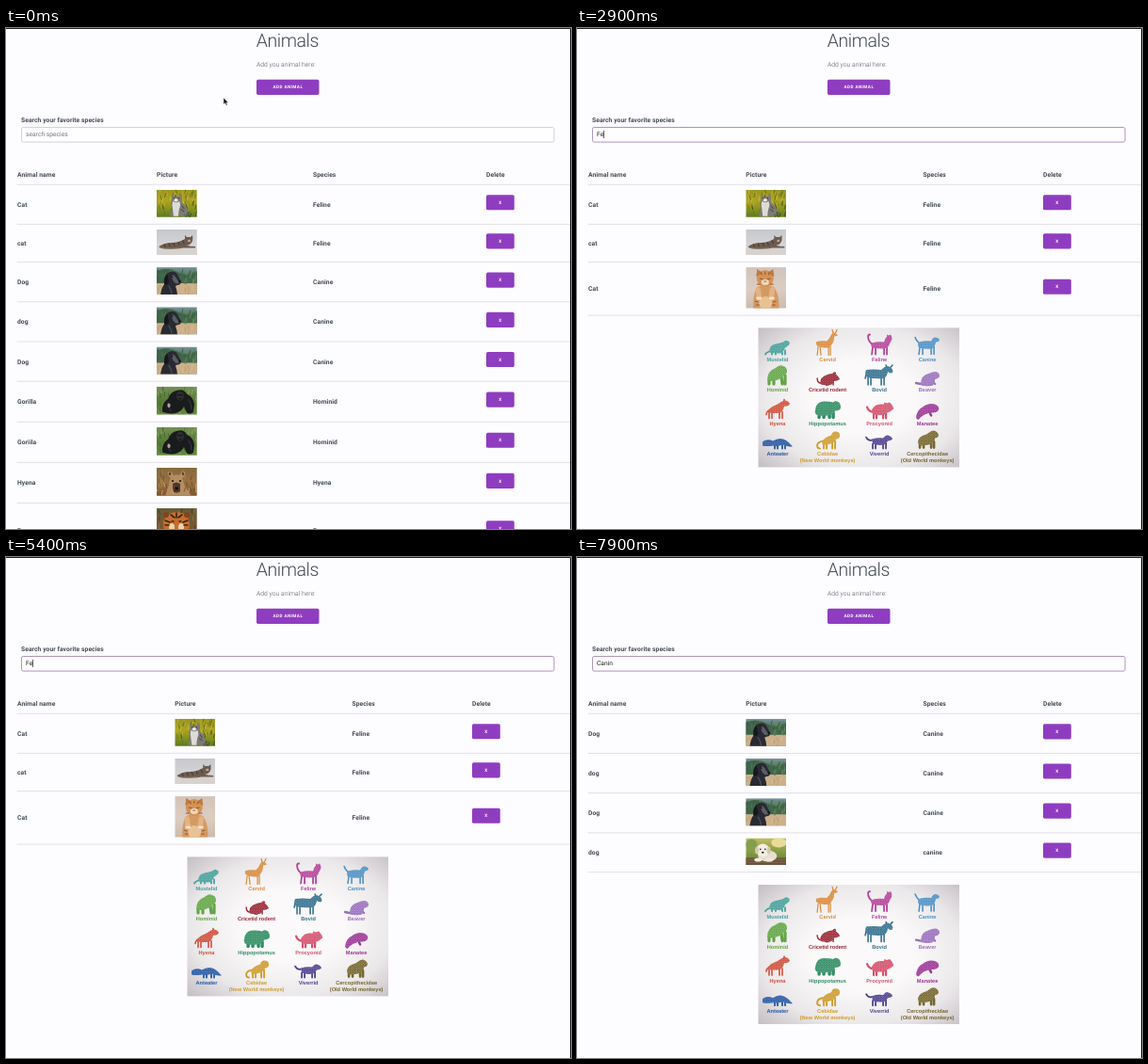
Animation of 600 by 532 pixels, one loop 8 s. Source, as an HTML page:

```html
<!DOCTYPE html>
<html lang="en">
<head>
<meta charset="utf-8">
<title>Animals</title>
<style>
  html, body { margin: 0; width: 100%; height: 100%; overflow: hidden; background: #fdfcff; }
  #stage { display: block; width: 600px; height: 532px; }
  text {
    font: 6.72px Roboto, sans-serif;
    letter-spacing: .01em;
    fill: #4b545d;
    text-rendering: geometricPrecision;
  }
  .bold { font-weight: 700; fill: #444c55; }
  .light { font-weight: 300; }
  .title { font-size: 19.5px; font-weight: 300; letter-spacing: -.42px; fill: #41494f; }
  .button { font-size: 4.62px; font-weight: 700; letter-spacing: .42px; fill: #fff; text-anchor: middle; }
  .label { font: 700 5.65px "Liberation Sans", Arial, sans-serif; letter-spacing: 0; text-anchor: middle; }
  #typed { fill: #222; letter-spacing: 0; }
  #hint { fill: #777; letter-spacing: 0; }
</style>
</head>
<body>
<svg id="stage" viewBox="0 0 600 532" xmlns="http://www.w3.org/2000/svg">
  <defs>
    <radialGradient id="paper" cx=".52" cy=".5" r=".72">
      <stop offset=".35" stop-color="#fbf9fa"/>
      <stop offset=".7" stop-color="#ebe8ea"/>
      <stop offset="1" stop-color="#c3bec3"/>
    </radialGradient>
    <pattern id="dots" width="2.6" height="2.6" patternUnits="userSpaceOnUse">
      <circle cx=".7" cy=".7" r=".6" fill="#fff"/>
      <circle cx="2" cy="2" r=".5" fill="#fff"/>
    </pattern>
  </defs>
  <rect width="600" height="532" fill="#fdfcff"/>
  <text class="title" x="265.7" y="19.6">Animals</text>
  <text class="light" x="266" y="40.6">Add you animal here:</text>
  <rect x="266" y="54.7" width="66.5" height="16.2" rx="1.7" fill="#8f3dc0"/>
  <text class="button" x="299.4" y="64.4">ADD ANIMAL</text>
  <text class="bold" x="16" y="100">Search your favorite species</text>
  <rect id="field" x="16.5" y="105.5" width="565.5" height="15.6" rx="1.8" fill="#fefdff" stroke="#d0cdd2" stroke-width=".9"/>
  <text id="hint" x="21" y="115.4">search species</text>
  <text id="typed" x="21" y="115.4"></text>
  <rect id="caret" y="109" width=".8" height="8" fill="#333"/>
  <g id="views"></g>
  <path d="M0 .5H599.5V532" fill="none" stroke="#1c1b20"/>
  <path id="arrow" d="M0 0V7.2L1.7 5.7L2.9 8.3L4.1 7.8L3 5.2H5.2Z" fill="#111" stroke="#fff" stroke-width=".5"/>
  <path id="beam" d="M-1.5-3.5Q0-3.5 0-2.5Q0-3.5 1.5-3.5M0-2.5V2.5M-1.5 3.5Q0 3.5 0 2.5Q0 3.5 1.5 3.5M-.8 .8H.8" fill="none" stroke="#222" stroke-width=".9"/>
</svg>
<script>
const $ = id => document.getElementById(id);
const rect = (x, y, w, h, fill) => `<rect x="${x}" y="${y}" width="${w}" height="${h}" fill="${fill}"/>`;
const oval = (x, y, rx, ry, fill) => `<ellipse cx="${x}" cy="${y}" rx="${rx}" ry="${ry}" fill="${fill}"/>`;
const shape = (d, fill) => `<path d="${d}" fill="${fill}"/>`;
const line = (d, color, w = 1) => `<path d="${d}" fill="none" stroke="${color}" stroke-width="${w}" stroke-linecap="round"/>`;
const text = (x, y, s, cls, extra = '') => `<text class="${cls}" x="${x}" y="${y}" ${extra}>${s}</text>`;

let gradients = 0;
function fade(...colors) {
  const id = 'fade' + gradients++;
  const stops = colors.map((c, i) => `<stop offset="${i / (colors.length - 1)}" stop-color="${c}"/>`).join('');
  return `<linearGradient id="${id}" x2="0" y2="1">${stops}</linearGradient>` + rect(0, 0, 43, 46, `url(#${id})`);
}

let seed = 7;
const rnd = () => (seed = seed * 16807 % 2147483647) / 2147483647;
function blades(n, top, height, colors) {
  return Array.from({ length: n }, () => {
    const x = rnd() * 43, y = top + rnd() * height;
    return line(`M${x.toFixed(1)} ${y.toFixed(1)}l${(rnd() * 3 - 1.5).toFixed(1)}-4`, colors[rnd() * colors.length | 0], .8);
  }).join('');
}

// Row height and flat drawing of each picture, 42.7 wide.
const pics = {
  cat: [42.1, fade('#98951f', '#aea422', '#7d8a20', '#3f6a1b', '#2f5717') +
    blades(45, 3, 15, ['#cdbb38', '#5d7020', '#c3b22e', '#4c691e']) +
    blades(25, 20, 10, ['#4f8423', '#284d14']) +
    shape('M14 28q1-5 2-9q-2-4 0-8l0-6l3 2h4l3-2q2 4 0 8q5 3 7 9q0 4-2 6z', '#7d7a75') +
    shape('M17 12q4 3 7 0q2 4 0 8q-1 4-1 8h-5l-1-8q-1-4 0-8z', '#dedbd6') +
    oval(20.5, 11, 2.2, 1.8, '#ece7e0') + line('M30 27q5 0 5-3', '#65625d', 1.6) +
    oval(18.6, 9, .7, .6, '#23241c') + oval(23, 9, .7, .6, '#23241c') +
    line('M27 17l2 3M26 21l3 2M20 5.8v1.4', '#45433f', 1)],
  loaf: [40.2, fade('#c6c7cc', '#d3d3d6', '#d2cfcf', '#d8d3d0') + rect(0, 20, 43, 9, '#d6d2cf') +
    shape('M4 17q5-3 12-3q7 0 12-3l2-1l0-4l2 2h4l2-2q1 5-1 8q-2 3-5 3q4 1 9 1v1.6h-13q-4 1-9 1q-10 1-15-1q-3-1 0-2.600z', '#6c5b4e') +
    line('M8 16l1 3M13 15l1 3M18 14.500l1 3M23 13.500l1 3M28 12l1 3', '#3f352e', .9) +
    oval(34.5, 12, 1.6, 1.2, '#c0a68e') + line('M6 20q10 1 18 0', '#a39384', .6)],
  tabby: [56.5, fade('#d2c3bb', '#dccdc2', '#cbb8a8') +
    shape('M8 44q-1-14 4-23q8-4 18 0q6 9 5 23z', '#d49a62') +
    oval(20.5, 12, 9, 9, '#d39359') + shape('M11 10l1-8l6 4zM30 10l-1-8l-6 4z', '#bd7a42') +
    oval(20.5, 16, 4, 3, '#f0d9bd') + oval(21, 38, 7, 7, '#e8c195') +
    line('M13 24l1 8M28 24l-1 8', '#e2b384', 5.5) +
    line('M12.500 33l3 0M26 33l3 0', '#f3e0c9', 3) +
    line('M15 12l3 .5M23 12.500l3-.5M19.500 15h2M16 6l1 2M20.500 5v2.500M25 6l-1 2M10 36l3 1M32 36l-3 1M11 40l3 0M31 40l-3 0M12 18l3 0M29 18l-3 0', '#8d5025', .9)],
  dog: [42.2, fade('#7a949b', '#4b6f58', '#3e6546', '#658058', '#c8ab7c', '#c9a678') +
    shape('M0 4q12-5 22 1t21-1v13H0z', '#40654a') + rect(0, 17, 43, 14, '#ccb08a') +
    blades(30, 6, 13, ['#527b4f', '#345a3c', '#6d8d5d']) + blades(12, 23, 8, ['#d9c19a', '#b89668']) +
    shape('M4 30q1-9 5-13q-1-5 1-9q4-5 9-3q3 1 4 5l3 5q0 4-4 4l-2 1q2 5 2 10z', '#292a31') +
    shape('M11 7q-4 4-3 11q4 2 5-3z', '#17181d') +
    shape('M17 8q3 1 4 4l3 4q-1 2-4 1q-3-2-4-6z', '#5b5e69') +
    oval(16.6, 10.3, .8, .7, '#0f1013') + oval(24.3, 15, 1.2, 1, '#101114') + line('M13 20q3 4 3 8', '#4a4d57', 1.4)],
  puppy: [41.8, fade('#c6bd62', '#8fa24a', '#70883a', '#7c6b42', '#59442e') + oval(35, 5, 8, 5, '#e9dc96') +
    oval(6, 7, 6, 6, '#839e4c') + rect(0, 21, 43, 10, '#6b543b') + line('M0 23H43M0 26H43', '#8e7554', .6) +
    oval(23, 19, 10, 6, '#e7dfd1') + oval(18, 13, 7, 7, '#f3eee4') +
    oval(11.7, 13, 2, 4, '#d8c8b0') + oval(24.3, 13, 2, 4, '#d8c8b0') +
    oval(15.5, 12, .8, .8, '#222') + oval(20.5, 12, .8, .8, '#222') + oval(18, 15.4, 1.3, 1, '#2c2522') +
    oval(13, 23, 4, 2, '#f3eee4') + oval(25, 23, 4, 2, '#efe8dc')],
  gorilla: [43.1, fade('#769055', '#557a36', '#668b40', '#4b6d2d') +
    blades(50, 3, 29, ['#8ba866', '#3b5f28', '#9ab478', '#52792f']) +
    shape('M6 27q-1-9 6-14q3-8 10-9q7-2 10 4q7 3 8 11l-1 8q-3 3-7 1l-3-7q-2 5-8 7q-6 2-15-1z', '#191b1d') +
    oval(25, 10, 4, 5, '#2d2e31') + line('M22.5 9h5M24 13h2', '#0d0e0f', .9) +
    line('M12 17q0 6 3 9M34 14q3 4 3 10', '#3a3c40') + oval(13, 20, 1.6, 2.2, '#b8a1a0')],
  hyena: [43, fade('#85693d', '#9a7141', '#7d512c', '#925f35') +
    blades(40, 3, 29, ['#af8750', '#6a4928', '#7d7441']) +
    shape('M9 30l4-12q0-4 2-7q-4-3-3-7q4 0 6 4q3-1 6 0q2-4 6-4q1 4-3 7q2 3 2 7l8 12z', '#b58c62') +
    shape('M17 17q4-3 8 0l0 8q-4 3-8 0z', '#4b372b') + oval(21, 22, 2.2, 1.6, '#16110e') +
    oval(17, 14, 1.2, 1, '#241812') + oval(25, 14, 1.2, 1, '#241812') +
    oval(14, 6.5, 1, 1.6, '#4e3525') + oval(28, 6.5, 1, 1.6, '#4e3525') +
    blades(12, 20, 9, ['#6d4a2e', '#d3ad80'])],
  tiger: [58, fade('#665d38', '#7e5530', '#633d22') + blades(24, 4, 25, ['#8d7c46', '#3d3820']) +
    oval(21, 17, 14, 13, '#c46e2b') + oval(10, 7, 3, 3, '#81451f') + oval(32, 7, 3, 3, '#81451f') +
    oval(16, 20, 3, 4, '#ecd3b0') + oval(26, 20, 3, 4, '#ecd3b0') +
    line('M15 7l4 3M27 7l-4 3M21 5v5M9 13l5 2M33 13l-5 2M9 18l4 0M33 18l-4 0M16 14h2M24 14h2', '#27190f', 1.4)]
};

// Poster animals, feet at 0,0: label, color, body, limbs, limb width, second line.
const species = [
  ['Mustelid', '#45a09a', 'M-9-3q0-8 7-9q5-1 8-2q3-3 5-1q3 1 1 4q-2 2-4 3q-2 6-6 6q-6 0-11-1z', 'M-9-4q-3 1-4 3M-6-3v2M-2-2v1M5-3v2M8-5v4'],
  ['Cervid', '#d98a3c', 'M-12-14q4-2 11-1q3-2 5-7q1-2 3-2q3 1 4 3l-4 1q0 6-3 9q-1 3-4 3q-7 0-11-2q-2-2-1-4z', 'M-10-9l-1 9M-8-9l1 9M1-9v9M3-9v9M6-23l-1-4M8-23l2-4', 1.2],
  ['Feline', '#b5429a', 'M-8-13q6-2 13-1q1-4 3-6l0-2l2 1l2-1q2 3 1 6q-2 3-3 6q-2 3-6 3q-7 0-11-1q-3-2-1-5z', 'M-8-12q-4-3-4-8q0-2 2-2M-7-9l-1 8M-4-8v7M5-8v7M8-8v7'],
  ['Canine', '#4d90c4', 'M-9-14q7-2 13-1q2-4 4-4q4 0 5 3q-1 2-4 2q-1 5-4 7q-8 1-14-1q-2-3 0-6z', 'M-9-13q-3-3-4-6M-8-9l-1 8M-5-8v7M4-8v7M7-9v8', 1.6],
  ['Hominid', '#62a545', 'M-11-6q0-10 9-13q4-4 8-2q4 1 4 6q-1 4-4 4l-2 3q-7 3-11 3q-3 0-4-1z', 'M-9-6v4M-4-5v3M4-10l1 8M8-11v9', 3.2],
  ['Cricetid rodent', '#9a2634', 'M-8-2q0-8 8-10q3-1 5-1q2-3 4-1l0 2q3 2 4 5q-3 2-6 2q-1 3-4 4h-8z', 'M-8-3q-3-1-3-5M-2-1h3M6-4v3', 1.4],
  ['Bovid', '#33708f', 'M-14-17q8-1 16 0q4-4 7-4l4 2q2 3 1 5q-3 1-5-1q-1 5-4 7q-10 1-18-1q-3-4-1-8z', 'M-13-16l-2 8M-12-9v8M-9-9v8M2-9v8M5-9v8M8-20l-1-2M12-20l2-2', 1.6],
  ['Beaver', '#9a6fbd', 'M-7-2q0-9 8-11q4-2 8-2q4 1 4 5q-2 3-5 3q0 5-3 7h-9q-3 0-3-2z', 'M-7-2l-5-1M-2-1h4M5-5l3 3', 2.4],
  ['Hyena', '#cf4f3a', 'M-10-10q4-4 10-6q4-3 7-4q5 0 6 4q-3 3-6 2q-1 5-4 7q-6 1-12 0q-2-1-1-3z', 'M-10-9q-2 2-2 4M-9-8v7M-6-7v6M2-8v7M5-8v7M7-19v-2', 1.6],
  ['Hippopotamus', '#2f8c62', 'M-13-10q1-9 10-9q6 0 9 1q2-2 4-1q4 1 4 7q-1 3-6 3q-3 5-8 5q-8 1-12-1q-2-2-1-5z', 'M-9-4v2M-4-4v2M2-5v3M6-7v5', 3.4],
  ['Procyonid', '#d4506c', 'M-8-10q3-6 9-6q2 0 4 0l0-2l3 1l3-1q4 4 4 7l-4 3q-4 1-5 3q-7 1-12 0q-3-2-2-5z', 'M-8-8q-4-1-5-5M-6-6v5M-3-6v5M4-6v5M7-7v6', 2.2],
  ['Manatee', '#9c3596', 'M-12-2q1-8 7-11q6-5 13-3q5 2 4 6q-2 3-6 3q-5 0-9 2q-4 2-6 5q-2 1-3-2z', 'M2-8l2 4', 2.4],
  ['Anteater', '#2456a4', 'M-16-8q5-4 11-1q6-4 11-2q4 1 10 8q-7 0-10-2q-6 2-11 1q-6 1-11 0z', 'M-3-5v4M0-5v4M5-5v4M8-5v4'],
  ['Cebidae', '#cf9c2c', 'M-5-10q4-4 9-5q1-4 4-4q5 0 5 4q0 4-4 4q-2 4-6 5q-6 2-9 0z', 'M-5-9q-6 1-6 5q0 3 3 3M-4-6v5M-1-5v4M5-8v7M8-9v8', 1.9, '(New World monkeys)'],
  ['Viverrid', '#50408f', 'M-8-11q7-2 12-1q3-4 5-3q4 1 5 4q-2 2-5 2q-2 3-4 4q-7 1-12-1z', 'M-8-10q-4 1-6-3M-7-6v5M-4-5v4M4-5v4M7-7v6'],
  ['Cercopithecidae', '#75652c', 'M-10-7q0-6 6-8q4-1 6-3q2-2 5-2q4 1 5 5q-1 3-4 3q0 4-3 6q-6 2-12 2q-3-1-3-3z', 'M-8-5v3M-4-4v2M4-8v6M7-8v6', 2.6, '(Old World monkeys)']
];

function poster(y) {
  const cols = [20.5, 73.6, 128.6, 179.6], rows = [33.5, 66, 101.5, 133.6];
  const cells = species.map(([name, color, body, limbs, width = 1.8, note], i) => {
    const x = cols[i % 4], mid = rows[i >> 2], fill = `style="fill:${color}"`;
    return `<g transform="translate(${x} ${mid - 4.4})">` + line(limbs, color, width) + shape(body, color) +
      `<path d="${body}" fill="url(#dots)" opacity=".45"/></g>` +
      text(x, mid + 2, name, 'label', fill) + (note ? text(x, mid + 9.2, note, 'label', fill) : '');
  });
  return `<g transform="translate(192.5 ${y})">${rect(0, 0, 213.5, 148, 'url(#paper)')}${cells.join('')}</g>`;
}

function table(cols, rows, withPoster) {
  const rule = y => line(`M12 ${y}H599`, '#dfdde2', .9);
  let y = 166.3;
  let out = ['Animal name', 'Picture', 'Species', 'Delete']
    .map((s, i) => text(cols[i], 157.7, s, 'bold')).join('') + rule(y);
  for (const [name, kind, pic] of rows) {
    const [h, art] = pics[pic], mid = y + h / 2;
    out += text(cols[0], mid + 2.4, name, 'bold') + text(cols[2], mid + 2.4, kind, 'bold') +
      `<svg x="${cols[1]}" y="${y + 5.5}" width="42.7" height="${h - 13.2}">${art}</svg>` +
      `<rect x="${cols[3]}" y="${mid - 10.2}" width="29.8" height="16.2" rx="1.7" fill="#8f3dc0"/>` +
      text(cols[3] + 15, mid - .4, 'X', 'button');
    out += rule(y += h);
  }
  return `<g>${out}${withPoster ? poster(y + 13.3) : ''}</g>`;
}

const cats = [['Cat', 'Feline', 'cat'], ['cat', 'Feline', 'loaf']];
const dogs = ['Dog', 'dog', 'Dog'].map(name => [name, 'Canine', 'dog']);
const rest = [['Gorilla', 'Hominid', 'gorilla'], ['Goriila', 'Hominid', 'gorilla'],
  ['Hyena', 'Hyena', 'hyena'], ['Beaver', 'Beaver', 'tiger']];
const wide = [12, 160, 326, 510], narrow = [12, 179.3, 367.5, 495];

$('views').innerHTML =
  table(wide, [...cats, ...dogs, ...rest]) +
  table(narrow, [...cats, ['Cat', 'Feline', 'tabby']], true) +
  table(narrow, [...dogs, ['dog', 'canine', 'puppy']], true);
const views = [...$('views').children];

const LOOP = 8000, CLICK = 1700;
const keys = [[CLICK, ''], [2400, 'F'], [2800, 'Fe'], [3100, 'Fel'], [3300, 'Feli'], [3600, 'Felin'], [3900, 'Feline'],
  [5000, 'Felin'], [5100, 'Feli'], [5200, 'Fel'], [5400, 'Fe'], [5500, 'F'], [5600, ''],
  [6500, 'C'], [6800, 'Ca'], [7000, 'Can'], [7100, 'Cani'], [7200, 'Canin']];
const show = (el, on) => el.style.display = on ? '' : 'none';

function draw(t) {
  const [since, value] = keys.findLast(k => k[0] <= t) || [0, ''];
  const focused = t >= CLICK;
  const view = value ? (value[0] === 'F' ? 1 : 2) : 0;
  views.forEach((v, i) => show(v, i === view));

  if ($('typed').textContent !== value) $('typed').textContent = value;
  show($('hint'), !value);
  $('field').setAttribute('stroke', focused ? '#a58ab3' : '#d0cdd2');
  $('caret').setAttribute('x', 21 + (value ? $('typed').getComputedTextLength() : 0));
  show($('caret'), focused && (t - since) % 1000 < 500);

  const p = Math.min(1, Math.max(0, (t - 100) / 800)), e = p * p * (3 - 2 * p);
  const x = 231 - 75 * e, y = 74 + 37.3 * e;
  const inField = y > 105.5, visible = t < 2400;
  show($('arrow'), visible && !inField);
  show($('beam'), visible && inField);
  for (const id of ['arrow', 'beam']) $(id).setAttribute('transform', `translate(${x} ${y})`);
}

function tick() {
  draw(performance.now() % LOOP);
  requestAnimationFrame(tick);
}
tick();
</script>
</body>
</html>
```
